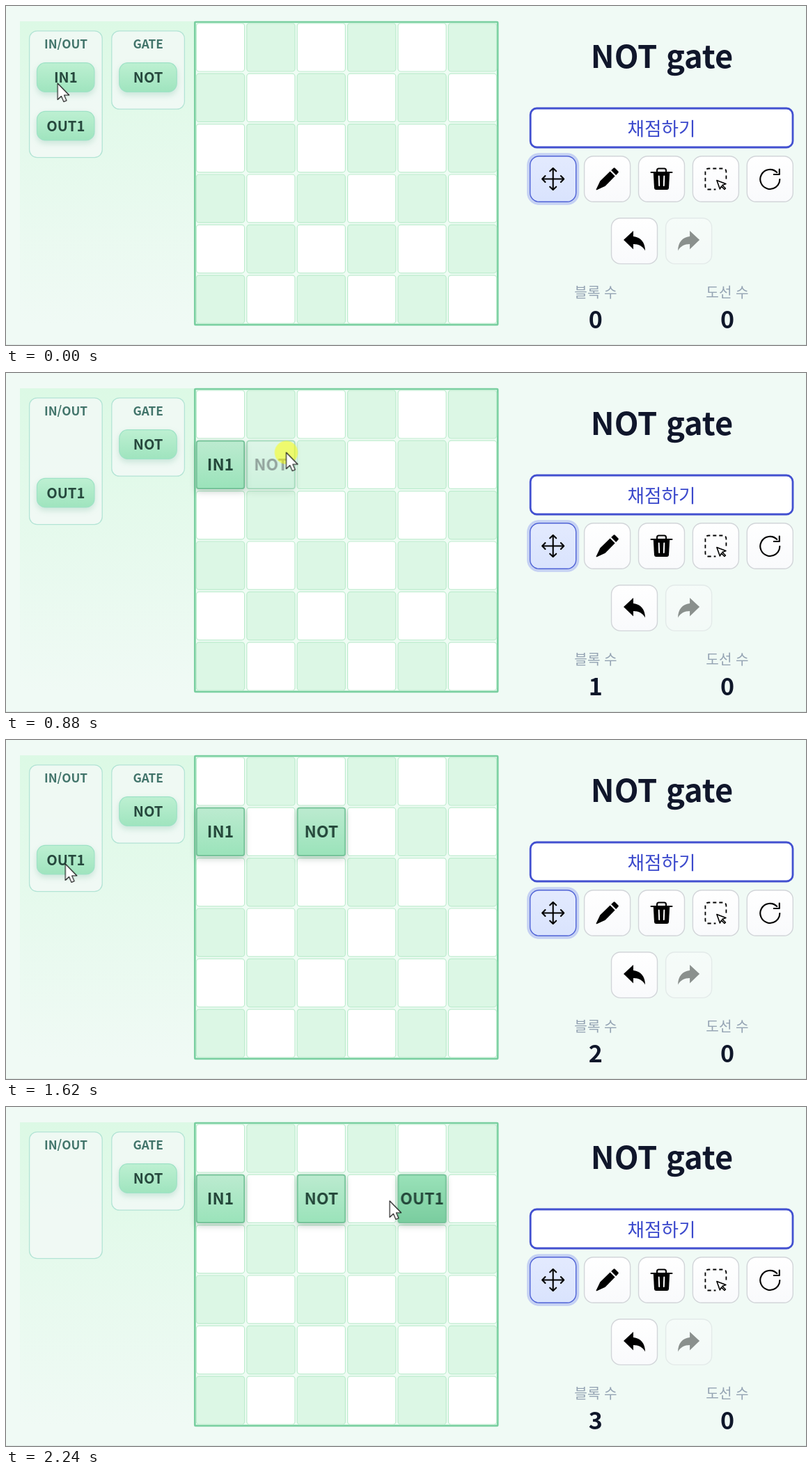
An HTML page that plays this animation: 1149 by 487 pixels, repeating every 2270 ms.

```html
<!DOCTYPE html>
<html lang="ko">
<head>
<meta charset="utf-8">
<title>NOT gate</title>
<style>
html, body { margin: 0; width: 100%; height: 100%; overflow: hidden; background: #f0faf5; }
svg { display: block; width: 1149px; height: 487px; }
text { font-family: "Noto Sans CJK KR", "Noto Sans KR", "Noto Sans CJK", "Noto Sans CJK JP", "Noto Sans", sans-serif; font-weight: 700; text-anchor: middle; }

.moving { animation: 2270ms linear infinite; }
.step { animation-timing-function: step-end; }
.btn { filter: drop-shadow(0 4px 4px rgba(52, 150, 110, .2)); }
.blk { filter: drop-shadow(0 4px 5px rgba(0, 40, 20, .2)); }

#pickIn { animation-name: pickIn; }
#pickOut { animation-name: pickOut; }
#blkIN1 { animation-name: blkIN1; }
#blkNOT { animation-name: blkNOT; }
#blkOUT1 { animation-name: blkOUT1; }
#hotIN1 { animation-name: hotIN1; }
#hotNOT { animation-name: hotNOT; }
#hotOUT1 { animation-name: hotOUT1; }
#n0 { animation-name: pickIn; }
#n1 { animation-name: n1; }
#n2 { animation-name: n2; }
#n3 { animation-name: n3; }
#cursor { animation-name: cursor; }
#press { animation-name: press; }

@keyframes pickIn { 0% { opacity: 1 } 19.3%, 100% { opacity: 0 } }
@keyframes pickOut { 0% { opacity: 1 } 96.9%, 100% { opacity: 0 } }
@keyframes n1 { 0% { opacity: 0 } 19.3% { opacity: 1 } 49.3%, 100% { opacity: 0 } }
@keyframes n2 { 0% { opacity: 0 } 49.3% { opacity: 1 } 96.9%, 100% { opacity: 0 } }
@keyframes n3 { 0% { opacity: 0 } 96.9%, 100% { opacity: 1 } }

/* half-transparent while dragged, solid once dropped */
@keyframes blkIN1 {
  0% { opacity: 0 }
  13.7% { opacity: .5 }
  19.3%, 100% { opacity: 1 }
}
@keyframes blkNOT {
  0% { opacity: 0; transform: translate(0, 0) }
  35% { opacity: .5; transform: translate(0, 0) }
  37.4% { opacity: .5; transform: translate(72.4px, 0) }
  40.5% { opacity: .5; transform: translate(144.8px, 0) }
  49.3%, 100% { opacity: 1; transform: translate(144.8px, 0) }
}
@keyframes blkOUT1 {
  0% { opacity: 0; transform: translate(0, 72.4px) }
  77.5% { opacity: .5; transform: translate(0, 72.4px) }
  79.2% { opacity: .5; transform: translate(72.4px, 0) }
  80.7% { opacity: .5; transform: translate(144.8px, 0) }
  82.6% { opacity: .5; transform: translate(217.2px, 0) }
  87.2% { opacity: .5; transform: translate(289.6px, 0) }
  96.9%, 100% { opacity: 1; transform: translate(289.6px, 0) }
}
@keyframes hotIN1 {
  0%, 19.2% { opacity: 0 } 19.3%, 22% { opacity: 1 } 25%, 52% { opacity: 0 }
  53.5%, 56% { opacity: 1 } 60%, 100% { opacity: 0 }
}
@keyframes hotNOT {
  0%, 49.2% { opacity: 0 } 49.3%, 51% { opacity: 1 } 54%, 80.2% { opacity: 0 }
  81%, 83% { opacity: 1 } 86%, 100% { opacity: 0 }
}
@keyframes hotOUT1 { 0%, 96.8% { opacity: 0 } 96.9%, 100% { opacity: 1 } }

@keyframes cursor {
  0% { transform: translate(74px, 111px); animation-timing-function: cubic-bezier(.4, .1, .8, .9) }
  11.01% { transform: translate(250px, 124px); animation-timing-function: ease-out }
  16.7%, 19.3% { transform: translate(312px, 128px) }
  23.8% { transform: translate(262px, 112px); animation-timing-function: ease-out }
  27.7% { transform: translate(213px, 97px) }
  30.8% { transform: translate(213px, 97px); animation-timing-function: cubic-bezier(.5, .1, .8, .8) }
  38.77% { transform: translate(402px, 114px); animation-timing-function: ease-out }
  46.2% { transform: translate(455px, 130px) }
  49.2% { transform: translate(455px, 130px); animation-timing-function: cubic-bezier(.3, .2, .7, .8) }
  55.07% { transform: translate(225px, 124px); animation-timing-function: cubic-bezier(.2, .5, .5, 1) }
  71.3% { transform: translate(84px, 178px) }
  72.7% { transform: translate(100px, 178px) }
  81.5% { transform: translate(494px, 152px); animation-timing-function: cubic-bezier(.1, .5, .5, 1) }
  93.8%, 96.6% { transform: translate(590px, 140px) }
  98.68% { transform: translate(552px, 135px) }
  100% { transform: translate(524px, 131px) }
}
@keyframes press {
  0% { opacity: 0 } 1.3% { opacity: 1 } 19.3% { opacity: 0 }
  33% { opacity: 1 } 49.3% { opacity: 0 } 72.6% { opacity: 1 } 96.9%, 100% { opacity: 0 }
}
</style>
</head>
<body>
<svg id="stage" viewBox="0 0 1149 487"></svg>
<script>
const PITCH = 72.4, CELL = 70.4, LEFT = 272.8, TOP = 24.2;

const rect = (x, y, w, h, r, attrs) =>
  `<rect x="${x}" y="${y}" width="${w}" height="${h}" rx="${r}" ${attrs}/>`;
const text = (s, x, y, size, fill, attrs = '') =>
  `<text x="${x}" y="${y}" font-size="${size}" fill="${fill}" ${attrs}>${s}</text>`;
const fade = (id, from, to) =>
  `<linearGradient id="${id}" x2="0" y2="1"><stop stop-color="${from}"/><stop offset="1" stop-color="${to}"/></linearGradient>`;

const defs = `<defs>
  ${fade('side', '#dcf9e5', '#f0faf5')}
  ${fade('mint', '#bdf0d2', '#9fe4be')}
  ${fade('tile', '#bcebd0', '#9ae3ba')}
  ${fade('deep', '#9ae2b9', '#7acd9f')}
  ${fade('tool', '#ffffff', '#f9fafc')}
  ${fade('active', '#e3eafe', '#d9e3fd')}
</defs>`;

const panel = (title, x, h) =>
  rect(x, 35.8, 104.6, h, 11, 'fill="#f2faf6" fill-opacity=".85" stroke="#b3e4d5" stroke-width="1.3"') +
  text(title, x + 52.4, 61.3, 17.2, '#41746a');

const button = (label, x, y, attrs = '') => `<g ${attrs}>
  <g class="btn">${rect(x, y, 82.4, 41.6, 12, 'fill="url(#mint)" stroke="#9ee2c6" stroke-width="1.2"')}</g>
  ${text(label, x + 41.3, y + 28.4, 20.2, '#26483d')}</g>`;

function board() {
  let out = rect(271.3, 23, 434.9, 434.9, 1, 'fill="#effcf4" stroke="#79cfa0" stroke-width="2.7"');
  for (let r = 0; r < 6; r++)
    for (let c = 0; c < 6; c++)
      out += rect(LEFT + c * PITCH + .6, TOP + r * PITCH + .6, CELL - 1.2, CELL - 1.2, 4,
        `fill="${(r + c) % 2 ? '#dcf7e5' : '#fff'}" stroke="#bdecce" stroke-width="1.2"`);
  return out;
}

function block(label) {
  const box = fill => rect(LEFT + 1, TOP + PITCH + 1, CELL - 2, CELL - 2, 3,
    `fill="url(#${fill})" stroke="#76c39a" stroke-width="1.8"`);
  return `<g id="blk${label}" class="moving step">
    <g class="blk">${box('tile')}</g>
    <g id="hot${label}" class="moving">${box('deep')}</g>
    ${text(label, LEFT + CELL / 2, 140, 23, '#24473a')}</g>`;
}

// icons are drawn around their own centre
const head = '<path d="M-4.5-11.2 0-15.5 4.5-11.2"/>';
const reply = '<path d="M-15.5-1.5-1.5-14.5V-6.5C9-5.5 15.5 2 15.5 14 12 7.500 6 4.500-1.500 4.500V12Z"/>';
const icons = {
  move: `<g fill="none" stroke="#000" stroke-width="2.1" stroke-linecap="round" stroke-linejoin="round">
    <path d="M0-15V15M-15 0H15"/>${[0, 90, 180, 270].map(a => `<g transform="rotate(${a})">${head}</g>`).join('')}</g>`,
  pencil: `<path d="M5.500-12.500 9-15.800Q10-16.500 11-15.800L15.800-11Q16.500-10 15.800-9L12.500-5.500Z"/>
    <path d="M4-11 11-4-3 10.300-15 15.800Q-16.500 16-15.800 14.500L-10.300 3Z"/>`,
  trash: `<path d="M-15-9.500H15" stroke="#000" stroke-width="2" stroke-linecap="round"/>
    <path d="M-6.500-10V-12.500Q-6.500-15-4-15H4Q6.500-15 6.500-12.500V-10" fill="none" stroke="#000" stroke-width="2"/>
    <path d="M-11.700-9H11.700L10.500 13Q10.200 15.500 7.700 15.500H-7.700Q-10.200 15.500-10.500 13Z"/>
    <path d="M-3.800-4 -3.300 9.500M3.800-4 3.300 9.500" stroke="#fff" stroke-width="2" stroke-linecap="round"/>`,
  select: `<path d="M15 0V-10Q15-15 10-15H-10Q-15-15-15-10V10Q-15 15-10 15H0" fill="none" stroke="#000" stroke-width="1.8" stroke-dasharray="5 4"/>
    <path d="M1.500 2 14.500 7 9.300 9 14 13.500 12.500 15 8 10.500 6 14.500Z" fill="#fff" stroke="#000" stroke-width="1.6" stroke-linejoin="round"/>`,
  reset: `<g fill="none" stroke="#000" stroke-width="2.1" stroke-linecap="round" stroke-linejoin="round">
    <path d="M9.900-9.500A14 14 0 1 0 14 .5"/><path d="M13.500-14V-6.500H5.500"/></g>`,
  undo: reply,
  redo: `<g transform="scale(-1 1)">${reply}</g>`
};

function tool(name, x, y, attrs = '') {
  const on = name === 'move';
  return `<g ${attrs}>
    ${on ? rect(x - 4.5, y - 4.5, 75, 74.6, 17, 'fill="#c5d1f3"') : ''}
    ${rect(x, y, 66, 65.6, 13, on
      ? 'fill="url(#active)" stroke="#4f63d6" stroke-width="1.4"'
      : 'fill="url(#tool)" stroke="#d2d5d9" stroke-width="1.4"')}
    <g transform="translate(${x + 33} ${y + 32.8})">${icons[name]}</g></g>`;
}

const tools = ['move', 'pencil', 'trash', 'select', 'reset']
  .map((name, i) => tool(name, 752.7 + i * 77.9, 215.7)).join('');

const counts = [0, 1, 2, 3].map(n =>
  text(n, 846.7, 463.3, 34, '#0f172a', `id="n${n}" class="moving step"`)).join('');

document.getElementById('stage').innerHTML = defs
  + '<path d="M0 486.500H1149" stroke="#dde8e4"/>'
  + rect(20, 22, 251, 436, 0, 'fill="url(#side)"')
  + panel('IN/OUT', 33.6, 181.8) + panel('GATE', 151.8, 112.4)
  + button('IN1', 44.5, 81.7, 'id="pickIn" class="moving step"')
  + button('OUT1', 44.5, 151.3, 'id="pickOut" class="moving step"')
  + button('NOT', 162.8, 81.7)
  + board()
  + text('NOT gate', 942, 89, 45.2, '#10162b')
  + rect(753.2, 147, 376.8, 56, 9, 'fill="#fff" stroke="#4250d0" stroke-width="2.8"')
  + text('채점하기', 941.5, 186, 26.6, '#3b49cc', 'style="font-weight:400"')
  + tools
  + tool('undo', 869.5, 304.8)
  + tool('redo', 947.6, 304.8, 'opacity=".42"')
  + text('블록 수', 847, 418.800, 20.2, '#94a3b3', 'style="font-weight:400"')
  + text('도선 수', 1036, 418.800, 20.2, '#94a3b3', 'style="font-weight:400"')
  + counts + text('0', 1036, 463.3, 34, '#0f172a')
  + block('IN1') + block('NOT') + block('OUT1')
  + `<g id="cursor" class="moving">
      <circle id="press" class="moving step" r="16.7" fill="#ff0" fill-opacity=".52"/>
      <path d="M0 0V23.500L5.300 18.500 8.800 26.500 12.800 24.800 9.400 17H16.500Z" fill="#fff" stroke="#111" stroke-width="1.1" stroke-linejoin="round"/>
    </g>`;
</script>
</body>
</html>
```
